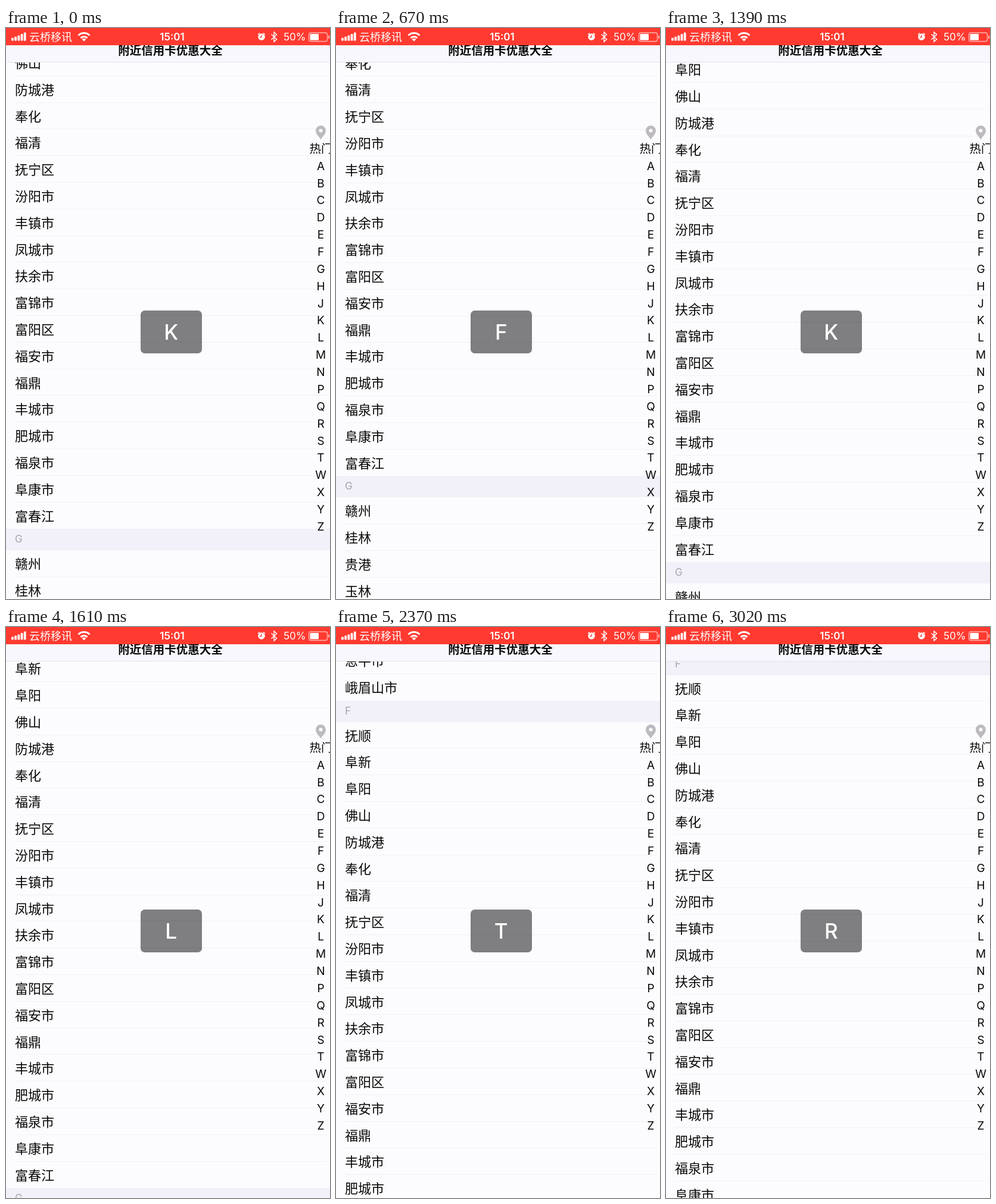
An HTML page that plays this animation: 544x960 px, repeating every 3040 ms.

```html
<!DOCTYPE html>
<html lang="zh-CN">
<head>
<meta charset="utf-8">
<title>城市列表</title>
<style>
  html, body { margin: 0; width: 100%; height: 100%; overflow: hidden; background: #fcfcfe; }
  body { font-family: "Noto Sans CJK SC", "Noto Sans CJK", sans-serif; color: #080808; }
  #stage { position: relative; width: 544px; height: 960px; overflow: hidden; background: #fcfcfe; }
  #stage > * { position: absolute; }

  #list { left: 0; top: 0; width: 100%; will-change: transform; }
  .row, .head { position: relative; padding-left: 15px; white-space: nowrap; }
  .row { height: 44.8px; line-height: 42.8px; font-size: 22px; }
  .row::after { content: ""; position: absolute; left: 15px; right: 5px; bottom: 0; height: 1px; background: #f1f0f5; }
  .row.last::after { display: none; }
  .head { height: 36px; background: #f2f0f8; color: #a6a5a8; font: 17px/35px Inter, sans-serif; }

  #nav { left: 0; top: 29px; width: 100%; height: 29px; background: #f8f7fd; border-bottom: 1px solid #e4e3ea; box-sizing: border-box; overflow: hidden; }
  #nav b { position: absolute; left: 4px; width: 100%; top: -7px; text-align: center; font-size: 19.5px; line-height: 30px; font-weight: 600; }

  #status { left: 0; top: 0; }
  #index { left: 0; top: 0; }
  #index text { font: 19px Inter, sans-serif; text-anchor: middle; fill: #080808; }
  #index .hot { font: 19.5px "Noto Sans CJK SC", "Noto Sans CJK", sans-serif; text-anchor: start; }

  #toast {
    left: 225.5px; top: 475px; width: 103.5px; height: 72px; border-radius: 7px;
    background: rgba(2, 0, 2, .5); color: #fff;
    font: 500 35px/72px Inter, sans-serif; text-align: center;
  }
</style>
</head>
<body>
<div id="stage">
  <div id="list"></div>

  <div id="nav"><b>附近信用卡优惠大全</b></div>

  <svg id="status" width="544" height="29" viewBox="0 0 544 29" fill="#fff">
    <rect width="544" height="29" fill="#ff3a30"/>
    <g id="bars"></g>
    <text x="39" y="21.5" font-size="18">云桥移讯</text>
    <g fill="none" stroke="#fff" stroke-width="3">
      <path d="M121.500 12.500a13.500 13.500 0 0 1 19 0"/>
      <path d="M125.500 16.800a8 8 0 0 1 11 0"/>
    </g>
    <path d="M131 22.500l-3.300-3.500a5 5 0 0 1 6.600 0z"/>
    <g font-family="Inter, sans-serif" font-size="17">
      <text x="279" y="21" font-weight="600" text-anchor="middle">15:01</text>
      <text x="466" y="21">50%</text>
    </g>
    <circle cx="429" cy="15" r="5.800"/>
    <path d="M423 11l3-2.500M435 11l-3-2.500" stroke="#fff" stroke-width="1.600"/>
    <path d="M429 11.500v4h-3" fill="none" stroke="#ff3a30" stroke-width="1.300"/>
    <path d="M445.500 10.500l9 8.500-4.500 4V7l4.500 4-9 8.500" fill="none" stroke="#fff" stroke-width="1.500"/>
    <rect x="508.500" y="8" width="31" height="14.500" rx="3" fill="none" stroke="#ffb5b0" stroke-width="1.300"/>
    <rect x="510.500" y="10" width="14.500" height="10.500" rx="1"/>
    <rect x="541" y="12.500" width="2" height="5.500" rx="1" fill="#ffb5b0"/>
  </svg>

  <svg id="index" width="544" height="960" viewBox="0 0 544 960">
    <path d="M528.500 187.500C525 182 520 178 520 172.500a8.500 8.500 0 0 1 17 0c0 5.500-5 9.500-8.500 15z" fill="#bcbabe"/>
    <circle cx="528.500" cy="172.500" r="3" fill="#fcfcfe"/>
    <text class="hot" x="509.500" y="210">热门</text>
  </svg>

  <div id="toast">K</div>
</div>

<script>
const LOOP = 3040, HOLD = 95, LETTERS = "ABCDEFGHJKLMNPQRSTWXYZ";
const SECTIONS = [
  ["", "恩平市 峨眉山市"],
  ["F", "抚顺 阜新 阜阳 佛山 防城港 奉化 福清 抚宁区 汾阳市 丰镇市 凤城市 扶余市 富锦市 富阳区 福安市 福鼎 丰城市 肥城市 福泉市 阜康市 富春江"],
  ["G", "赣州 桂林 贵港 玉林 广元 广安"]
];

// time, list offset, position along the letter index
const TRACK = [
  [0, -224, 9.5], [550, -335, 5.2], [670, -313, 5.6], [1090, -230, 7.8],
  [1610, -123, 10.8], [1990, -46, 13.6], [2370, 34, 17.2], [2500, 60, 18.6],
  [3020, -45, 15.4], [3040, -49, 15.3]
];
const STALLS = [20, 200, 380, 560, 730, 900, 1090, 1270, 1450, 1630, 1810, 2010, 2170, 2390, 2550, 2700, 2880];

const byId = id => document.getElementById(id);
const list = byId("list"), toast = byId("toast");

list.innerHTML = SECTIONS.map(([head, names]) => {
  const rows = names.split(" ");
  return (head && `<div class="head">${head}</div>`) + rows.map((name, i) =>
    `<div class="row${i === rows.length - 1 ? " last" : ""}">${name}</div>`).join("");
}).join("");

byId("index").insertAdjacentHTML("beforeend", [...LETTERS].map((c, i) =>
  `<text x="528.5" y="${(238.7 + i * 28.86).toFixed(1)}">${c}</text>`).join(""));

byId("bars").innerHTML = [5, 7, 9, 11.5, 14].map((h, i) =>
  `<rect x="${9 + i * 5.2}" y="${21.5 - h}" width="3.8" height="${h}" rx="1"/>`).join("");

function stalled(t) {
  const start = STALLS.find(s => t >= s && t < s + HOLD);
  return start === undefined ? t : start;
}

function sample(t) {
  const i = Math.max(1, TRACK.findIndex(k => k[0] >= t));
  const a = TRACK[i - 1], b = TRACK[i], p = (t - a[0]) / (b[0] - a[0]);
  return [1, 2].map(n => a[n] + (b[n] - a[n]) * p);
}

function draw() {
  const [offset, pick] = sample(stalled(performance.now() % LOOP));
  list.style.transform = `translateY(${Math.round(offset)}px)`;
  toast.textContent = LETTERS[Math.floor(pick)];
  requestAnimationFrame(draw);
}
draw();
</script>
</body>
</html>
```
